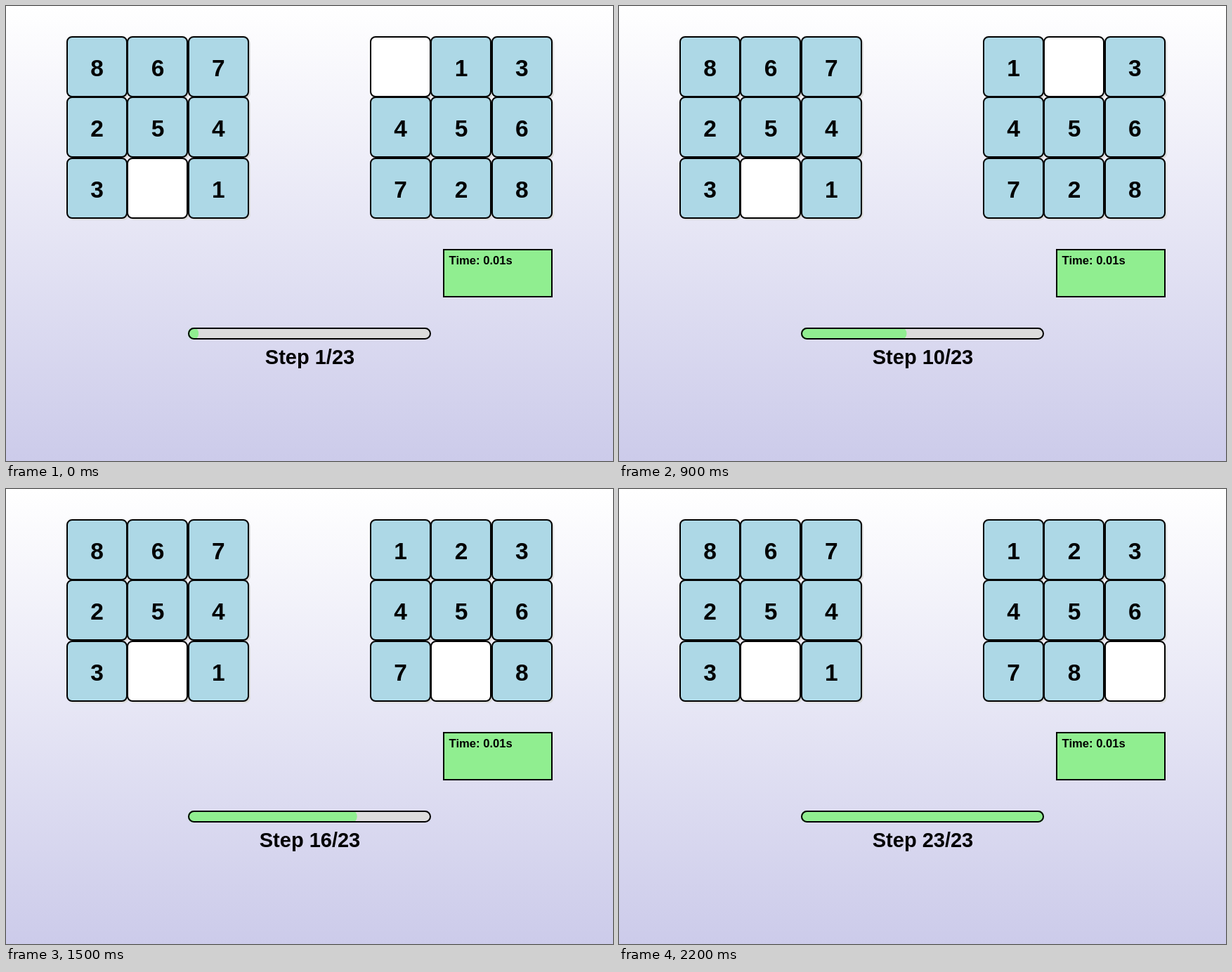
An HTML page with a canvas for the animation above (2300 ms loop, 864x648 px).

```html
<!DOCTYPE html>
<html lang="en">
<head>
<meta charset="utf-8">
<title>Sliding puzzle</title>
<style>
  html, body { margin: 0; width: 100%; height: 100%; overflow: hidden; }
  canvas { display: block; }
</style>
</head>
<body>
<canvas id="stage" width="864" height="648"></canvas>
<script>
const ctx = document.getElementById("stage").getContext("2d");
const W = 864, H = 648;
const STEPS = 23, STEP_MS = 100;
const CELL = W / 10;
const SANS = '"Liberation Sans", Arial, sans-serif';
const NARROW = '"Liberation Sans Narrow", "Arial Narrow", ' + SANS;

const START = "8672543 1";
// Each state holds from its step until the next one begins.
const STATES = [
  { from: 1, tiles: " 13456728" },
  { from: 8, tiles: "1 3456728" },
  { from: 13, tiles: "1234567 8" },
  { from: 23, tiles: "12345678 " }
];

const sky = ctx.createLinearGradient(0, 0, 0, H);
sky.addColorStop(0, "#ffffff");
sky.addColorStop(1, "#cccbea");

function roundBox(x, y, w, h, r, fill, line) {
  ctx.beginPath();
  ctx.roundRect(x, y, w, h, r);
  if (fill) {
    ctx.fillStyle = fill;
    ctx.fill();
  }
  if (line) {
    ctx.strokeStyle = "#000";
    ctx.lineWidth = 2;
    ctx.stroke();
  }
}

function label(text, x, y, size, align, family) {
  ctx.font = `bold ${size}px ${family}`;
  ctx.textAlign = align;
  ctx.textBaseline = "alphabetic";
  ctx.fillStyle = "#000";
  ctx.fillText(text, x, y);
}

function drawBoard(tiles, left) {
  [...tiles].forEach((digit, i) => {
    const cx = left + (i % 3) * CELL;
    const cy = CELL / 2 + Math.floor(i / 3) * CELL;
    const x = Math.floor(cx), y = Math.floor(cy);
    roundBox(x + 3, y + 3, 86, 86, 8, "#dcdcdc");
    roundBox(x + 1, y + 1, 85, 85, 7, digit === " " ? "#fff" : "#add8e6", true);
    label(digit, cx + CELL / 2, Math.round(cy + 56.5), 33.5, "center", NARROW);
  });
}

function drawBar(step) {
  const x = 259, y = 458, w = 346, h = 17;
  roundBox(x, y, w, h, 8.5, "#dcdcdc");
  roundBox(x, y, w * step / STEPS, h, 8, "#90ee90");
  roundBox(x + 1, y + 1, w - 2, h - 2, 7.5, null, true);
}

function draw(step) {
  ctx.fillStyle = sky;
  ctx.fillRect(0, 0, W, H);
  drawBoard(START, CELL);
  drawBoard(STATES.findLast(s => step >= s.from).tiles, 6 * CELL);
  roundBox(623, 347, 154, 67, 0, "#90ee90", true);
  label("Time: 0.01s", 630.6, 368, 16.6, "left", SANS);
  drawBar(step);
  label(`Step ${step}/${STEPS}`, 432.5, 510, 29, "center", SANS);
}

const begin = performance.now();
function tick() {
  const t = Math.max(0, performance.now() - begin);
  draw(Math.floor(t / STEP_MS) % STEPS + 1);
  requestAnimationFrame(tick);
}
tick();
</script>
</body>
</html>
```
